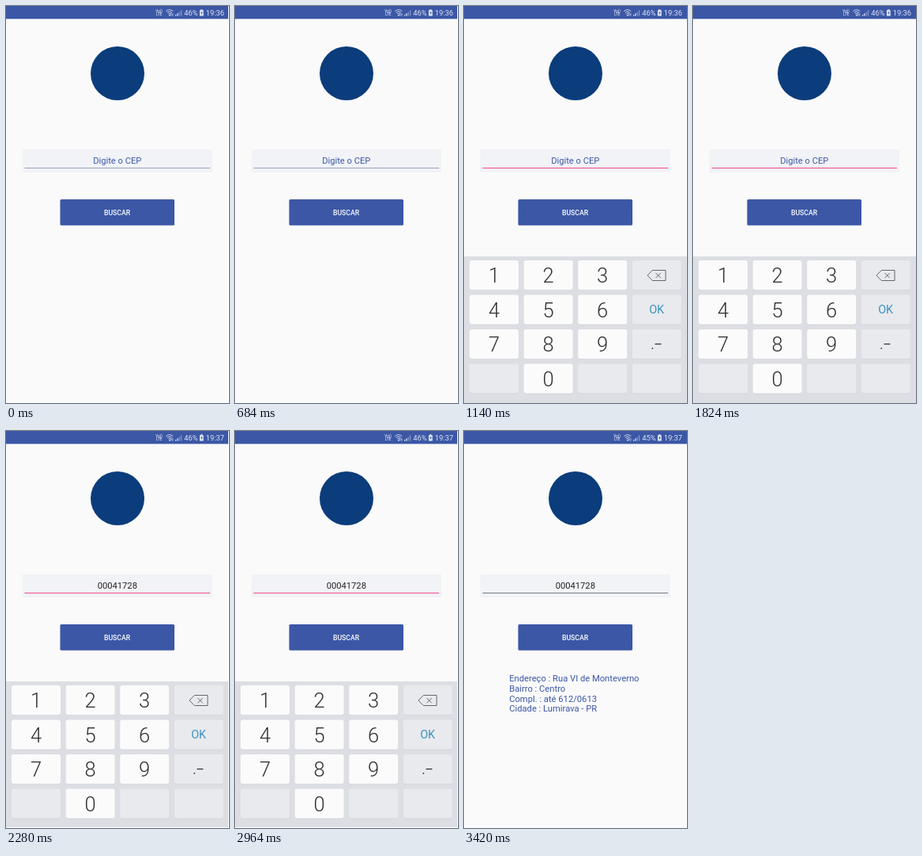
Animation of 282x501 px, one loop 4.56 s. Source, as an HTML page:

```html
<!DOCTYPE html>
<html lang="pt-BR">
<head>
<meta charset="utf-8">
<style>
html, body { margin: 0; width: 100%; height: 100%; overflow: hidden; background: #fafafa; }
svg { display: block; width: 100%; height: 100%; font-family: Roboto, sans-serif; }
.mid { text-anchor: middle; }
.status { fill: #dfe5f3; font-size: 9.4px; }
.tiny { font-size: 4.5px; font-weight: 500; }
.digit { font-size: 25.5px; font-weight: 300; fill: #303030; }
.body { font-size: 11.2px; fill: #3b57a6; }
</style>
</head>
<body>
<svg viewBox="0 0 282 501" preserveAspectRatio="none">
  <rect width="282" height="501" fill="#fafafa"/>
  <rect width="282" height="16.3" fill="#3b57a6"/>

  <g class="status">
    <text class="tiny mid" x="193.6" y="7.8">Vo))</text>
    <text class="tiny mid" x="193.6" y="12.3">LTE</text>
    <g fill="none" stroke="#dfe5f3" stroke-width=".9">
      <path d="M202.3 6.6Q206.8 2.8 211.3 6.6M203.8 8.3Q206.8 5.8 209.8 8.3M205.3 10Q206.8 8.8 208.3 10"/>
      <path d="M208.8 9.2V12.4M210.8 9.2V12.4" stroke-width=".8"/>
    </g>
    <path d="M206 11h1.6v1.5h-1.6zM214 11h1.3v1.5H214zM216.3 9.3h1.3v3.2h-1.3z"/>
    <path d="M218.6 7.4h1.3v5.1h-1.3zM220.9 5.2h1.3v7.3h-1.3z" opacity=".45"/>
    <text id="charge" x="225.2" y="12.2"></text>
    <path d="M246.2 4.2h2.2v1h1.3v7.3h-4.8V5.2h1.3z"/>
    <path d="M248 6.3l-2 2.8h1.2l-.5 2.2 2-3h-1.2z" fill="#3b57a6"/>
    <text id="clock" x="252.7" y="12.2"></text>
  </g>

  <circle cx="141" cy="85" r="34" fill="#0b3c7b"/>

  <rect x="20.5" y="181" width="240.5" height="29" fill="#f2f3f7"/>
  <rect id="line" x="23.5" y="204" width="234.5" height="1"/>
  <text id="field" class="body mid" x="140.8" y="199.4"></text>

  <rect x="68.5" y="244.5" width="144.5" height="33" rx="2" fill="#e2e4ea"/>
  <rect x="68.5" y="244" width="144.5" height="32.8" rx="1.5" fill="#3b57a6"/>
  <text class="mid" x="140.6" y="264" font-size="8.7" font-weight="500" fill="#fff">BUSCAR</text>

  <g id="result" class="body"></g>

  <g id="keypad">
    <rect y="316" width="282" height="185" fill="#dcdee3"/>
    <g id="keys"></g>
    <path d="M232 340L238.3 333.5H255V346.5H238.3ZM242.5 337L248.7 343.2M248.7 337L242.5 343.2" fill="none" stroke="#555a60" stroke-width=".9"/>
    <text class="mid" x="243.7" y="388" font-size="14.4" fill="#3a93bd">OK</text>
    <text class="mid" x="243.5" y="432.5" font-size="16" fill="#303030">.–</text>
  </g>
  <path id="edge" d="M281 0H282V501H0V500H281Z" fill="#fff"/>
</svg>
<script>
const $ = id => document.getElementById(id);
const HOLD = 1140, CEP = '00041728', HINT = 'Digite o CEP';
const BLUE = '#3b57a6', INK = '#222', PINK = '#f5488a';

const scenes = [
  { charge: '46%', clock: '19:36', field: HINT, ink: BLUE, line: '#98a0b8', edge: true },
  { charge: '46%', clock: '19:36', field: HINT, ink: BLUE, line: PINK, keypad: true },
  { charge: '46%', clock: '19:37', field: CEP, ink: INK, line: PINK, keypad: true, edge: true },
  { charge: '45%', clock: '19:37', field: CEP, ink: INK, line: '#747887', result: true }
];

const lines = [
  'Endereço : Rua VI de Monteverno',
  'Bairro : Centro',
  'Compl. : até 612/0613',
  'Cidade : Lumirava - PR'
];
$('result').innerHTML = lines.map((s, i) =>
  `<text x="57.2" y="${316.2 + i * 12.75}">${s}</text>`).join('');

const labels = ['1', '2', '3', '', '4', '5', '6', '', '7', '8', '9', '', '', '0', '', ''];
$('keys').innerHTML = labels.map((s, i) => {
  const x = 7 + i % 4 * 68.6, y = 321 + (i >> 2) * 43.5;
  return `<rect x="${x}" y="${y + .8}" width="62" height="37.2" rx="3" fill="#cfd2d8"/>
    <rect x="${x}" y="${y}" width="62" height="37.2" rx="3" fill="${s ? '#fbfbfc' : '#e8eaee'}"/>
    <text class="digit mid" x="${x + 31}" y="${y + 28}">${s}</text>`;
}).join('');

let shown;
function draw(now) {
  const s = scenes[Math.floor(now / HOLD) % scenes.length];
  if (s === shown) return;
  shown = s;
  for (const id of ['charge', 'clock', 'field']) $(id).textContent = s[id];
  for (const id of ['keypad', 'result', 'edge']) $(id).style.display = s[id] ? '' : 'none';
  $('field').style.fill = s.ink;
  $('line').setAttribute('fill', s.line);
}

const start = performance.now();
function tick() {
  draw(performance.now() - start);
  requestAnimationFrame(tick);
}
tick();
</script>
</body>
</html>
```
